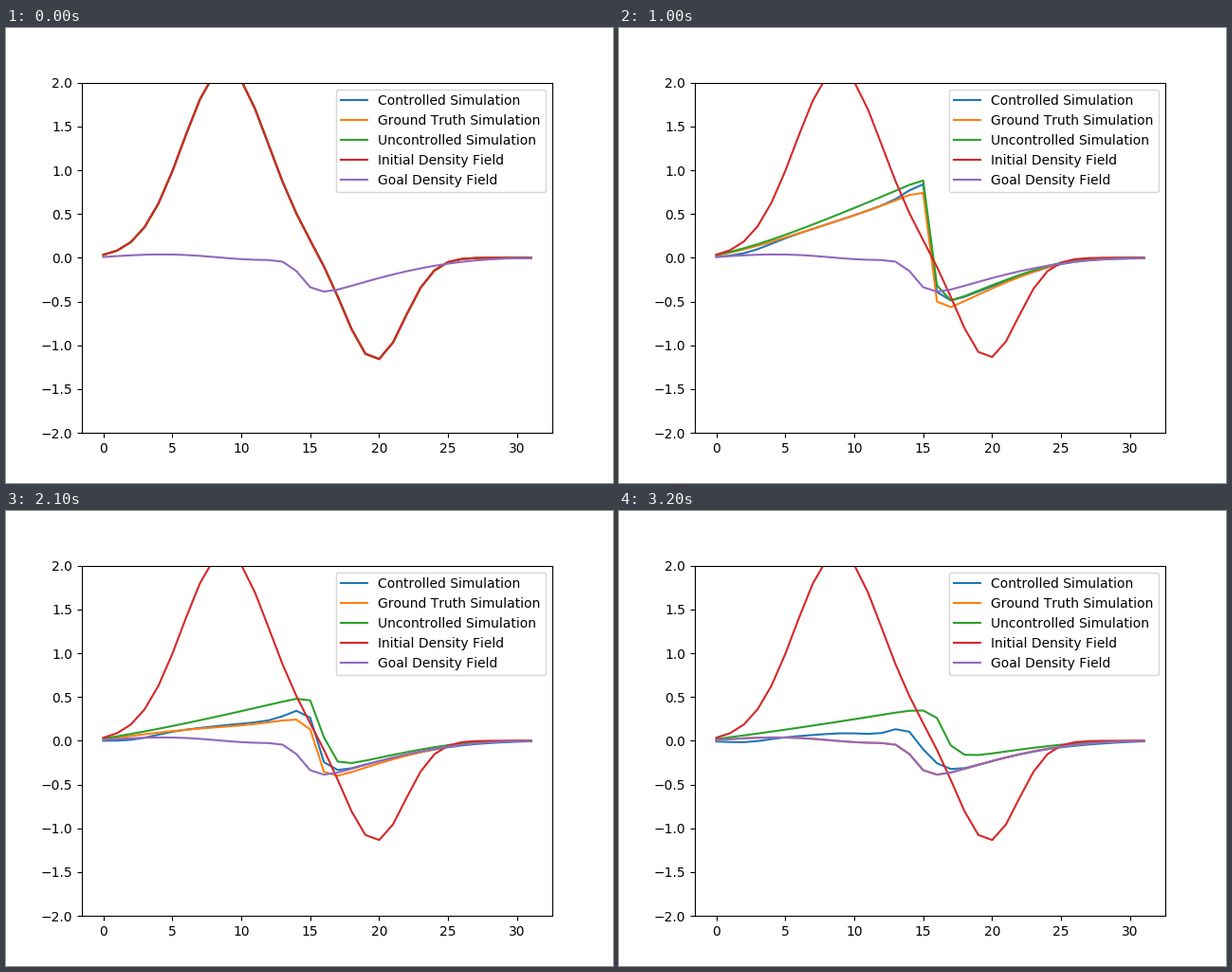
These frames come from a looping animation (640 by 480 pixels, 3.3 s). A matplotlib script:

```python
import numpy as np
import matplotlib.pyplot as plt
from matplotlib.animation import FuncAnimation

plt.rcParams["text.kerning_factor"] = 6   # whole-pixel kerning

CELLS, STEPS = 32, 32
DT = 0.03
SHIFT = DT * CELLS                    # cells travelled per step at unit speed
ALPHA = 0.003 * DT * CELLS ** 2       # viscosity per step
x = np.arange(CELLS)


def bell(amp, loc, sig):
    return amp * np.exp(-0.5 * ((x - loc) / sig) ** 2)


def diffuse(u):
    return u + ALPHA * np.diff(np.pad(u, 1), 2)


def burgers(u, force=0.0):
    """Semi-Lagrangian Burgers flow, zero outside the grid, one row per step."""
    rows = [u]
    grid = np.arange(-1, CELLS + 1)
    for _ in range(STEPS):
        v = diffuse(rows[-1])
        rows.append(np.interp(x - SHIFT * v, grid, np.pad(v, 1)) + force)
    return rows


def drift(n):
    """How far the controlled run strays from the ground truth."""
    t = n / STEPS
    late = t ** 4
    shock = bell(0.1 + 0.14 * late, 16 - 1.5 * t, 1.3)
    ends = bell(-0.045, 2.2, 1.6) + bell(-0.013, 27.5, 2.5)
    return (min(1, n / 5) * (shock + ends)
            + bell(0.1 * late, 10.2, 2.5)
            + bell(0.16 * t * (1 - t), 18.5, 1.8))


start = bell(2.17, 8.86, 3.07) + bell(-1.17, 19.71, 2.10)
smoothed = diffuse(start)
free = burgers(start)
truth = burgers(start, bell(-0.0206, 12.95, 4.94))
control = [u + drift(n) for n, u in enumerate(truth)]
goal = truth[-1]

fig, ax = plt.subplots(figsize=(6.4, 4.8), dpi=100)
names = ["Controlled Simulation", "Ground Truth Simulation",
         "Uncontrolled Simulation", "Initial Density Field",
         "Goal Density Field"]
lines = [ax.plot(x, start, label=name)[0] for name in names]
ax.set_ylim(-2, 2)
ax.legend(loc="upper right")


def draw(n):
    initial = start if n == 0 else smoothed
    for line, u in zip(lines, (control[n], truth[n], free[n], initial, goal)):
        line.set_ydata(u)
    return lines


anim = FuncAnimation(fig, draw, frames=STEPS + 1, interval=100,
                     repeat=True, repeat_delay=0)
plt.show()
```
